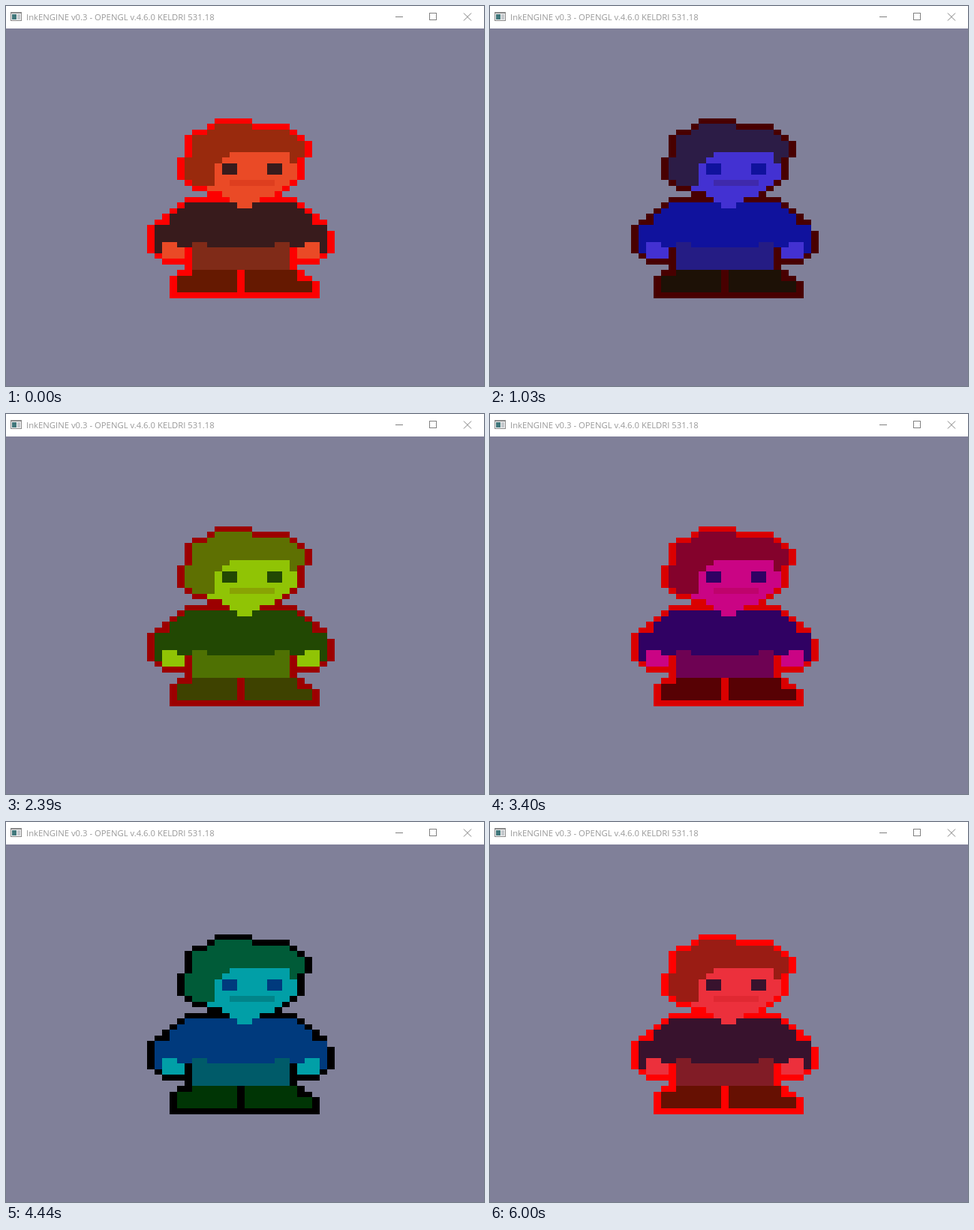
Recreate the animation shown at these times as an HTML page with a canvas. Size 637 px wide and 507 px high, loop 6100 ms.

```html
<!DOCTYPE html>
<html lang="en">
<head>
<meta charset="utf-8">
<title>InkENGINE</title>
<style>
  html, body { margin: 0; width: 100%; height: 100%; overflow: hidden; background: #808099; }
  canvas { display: block; }
</style>
</head>
<body>
<canvas id="stage" width="637" height="507"></canvas>
<script>
const ctx = document.getElementById('stage').getContext('2d');
const BACK = '#808099';

function rect(color, x, y, w, h) {
  ctx.fillStyle = color;
  ctx.fillRect(x, y, w, h);
}

// Fill the sprite cells from (left, top) up to (right, bottom)
function cells(color, left, right, top, bottom) {
  const row = r => 150 + Math.floor(r * 7.5);
  rect(color, 188 + left * 10, row(top), (right - left) * 10, row(bottom) - row(top));
}

const mirror = ([left, right, top, bottom]) => [25 - right, 25 - left, top, bottom];
const both = bars => [...bars, ...bars.map(mirror)];

// Each part is a stack of bars: left, right, top, bottom
const hair = {
  color: [154, 129, 70],
  bars: [[9, 14, 1, 2], [8, 19, 2, 3], [6, 20, 3, 8], [6, 21, 4, 7], [5, 9, 7, 11], [6, 9, 11, 12]]
};
const shirt = {
  color: [56, 83, 157],
  bars: [[5, 20, 15, 16], [4, 21, 16, 17], [3, 22, 17, 19], [1, 24, 19, 23],
    ...both([[1, 2, 23, 24]])]
};
const face = {
  color: [236, 226, 210],
  bars: [[11, 19, 6, 7], [10, 19, 7, 8], [9, 20, 8, 11], [9, 19, 11, 12],
    [8, 18, 12, 13], [10, 17, 13, 14], [11, 15, 14, 15], [12, 14, 15, 16]]
};
const pants = {
  color: [129, 130, 132],
  bars: [[6, 19, 23, 27], ...both([[6, 8, 22, 23]])]
};
const hands = { color: face.color, bars: both([[2, 4, 22, 23], [2, 5, 23, 25]]) };
const boots = {
  color: [102, 76, 6],
  bars: [[6, 12, 27, 28], [4, 12, 28, 31], [13, 20, 27, 29], [13, 22, 29, 31]]
};
const eyes = { color: shirt.color, bars: [[10, 12, 8, 10], [16, 18, 8, 10]] };
const mouth = { color: [224, 188, 172], bars: [[11, 17, 11, 12]] };
const parts = [hair, shirt, face, pants, hands, boots, eyes, mouth];

function drawSprite(ms) {
  // Red, green and blue light are cosines a third of a turn apart
  const angle = 2 * Math.PI * (ms - 80) / 2940;
  const light = [0, 1, 2].map(i => 0.5 + 0.5 * Math.cos(angle + i * 2 * Math.PI / 3));
  const lit = color => `rgb(${color.map((c, i) => Math.round(c * light[i]))})`;

  // The outline is one cell around every bar
  const edge = lit([255, 0, 0]);
  for (const { bars } of parts)
    for (const [l, r, t, b] of bars) {
      cells(edge, l - 1, r + 1, t, b);
      cells(edge, l, r, t - 1, b + 1);
    }
  cells(edge, 3, 23, 31, 32);
  cells(BACK, 24, 25, 19, 20);

  for (const { color, bars } of parts)
    for (const bar of bars) cells(lit(color), ...bar);
}

function line(x1, y1, x2, y2) {
  ctx.beginPath();
  ctx.moveTo(x1, y1);
  ctx.lineTo(x2, y2);
  ctx.stroke();
}

function drawWindow() {
  rect(BACK, 0, 0, 637, 507);
  rect('#fff', 0, 0, 637, 30);

  rect('#8a8a8a', 6, 8, 15, 12);
  rect('#f4f4f4', 7, 10, 13, 9);
  rect('#42787c', 8, 11, 6, 7);
  rect('#c4c8cc', 15, 11, 4, 7);

  ctx.font = '11.3px "Open Sans", "Noto Sans", sans-serif';
  ctx.fillStyle = '#999';
  ctx.fillText('InkENGINE v0.3 - OPENGL v.4.6.0 KELDRI 531.18', 27, 19);

  ctx.strokeStyle = '#808080';
  line(519, 14.5, 529, 14.5);
  ctx.strokeRect(564.5, 9.5, 9, 9);
  line(610, 9.5, 620, 19.5);
  line(620, 9.5, 610, 19.5);
}

// Redraw times: evenly spaced runs of first, last, count
const LOOP = 6100;
const runs = [
  [90, 610, 6], [730, 1320, 7], [1430, 1630, 3], [1780, 2390, 7], [2510, 3080, 7],
  [3200, 3760, 7], [3880, 4440, 6], [4560, 5150, 6], [5210, 5790, 7], [5910, 6000, 2]
];
const ticks = [0];
for (const [first, last, count] of runs)
  for (let i = 0; i < count; i++)
    ticks.push(Math.round(first + (last - first) * i / (count - 1)));

const start = performance.now();
function frame() {
  const t = (performance.now() - start) % LOOP;
  drawWindow();
  drawSprite(ticks.filter(tick => tick <= t).pop());
  requestAnimationFrame(frame);
}
frame();
</script>
</body>
</html>
```
